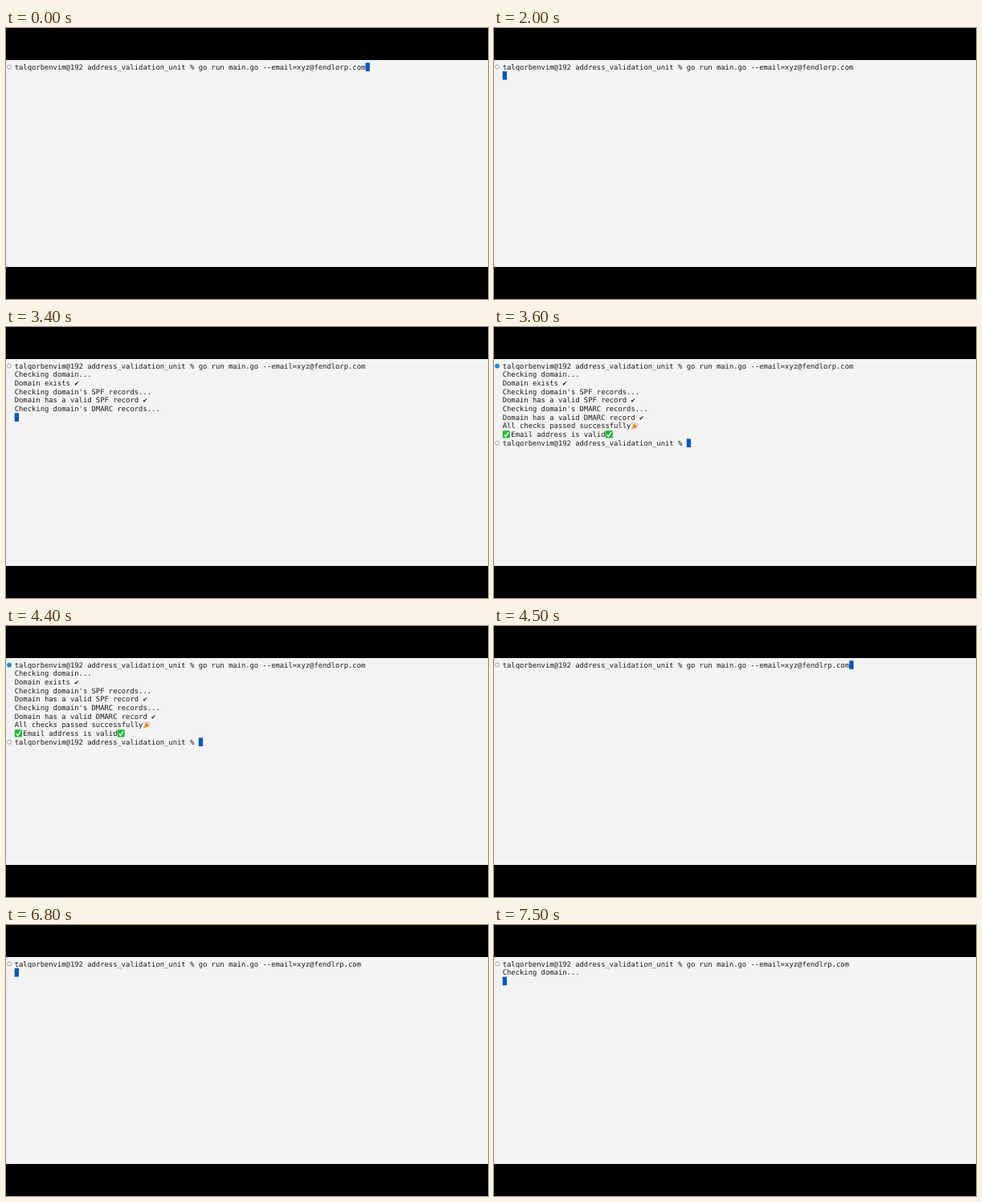
Recreate the animation shown at these times as an HTML page. Size 600x338 px, loop 8000 ms.

```html
<!DOCTYPE html>
<html lang="en">
<head>
<meta charset="utf-8">
<title>Terminal session</title>
<style>
  html, body { margin: 0; width: 100%; height: 100%; overflow: hidden; background: #000; }
  svg { display: block; width: 100%; height: 100%; }
  text {
    font: 8.85px "DejaVu Sans Mono", "Liberation Mono", monospace;
    fill: #1c1c1c;
    text-rendering: geometricPrecision;
    white-space: pre;
  }
</style>
</head>
<body>
<svg viewBox="0 0 600 338">
  <defs>
    <g id="tick">
      <rect x=".3" y=".6" width="9.2" height="9.2" rx="1.4" fill="#22b83a"/>
      <path d="M2.3 5.6 4.2 7.8 7.6 2.5" fill="none" stroke="#fff" stroke-width="1.4"/>
    </g>
    <g id="popper">
      <path d="M.5 9.6 3 3.2Q6.4 4.6 7.2 7.6Z" fill="#efa43c"/>
      <path d="M3 3.2Q6.6 3.6 7.2 7.6 4 7 3 3.2Z" fill="#c9722e"/>
      <path d="M4.4 3.5Q5.8 2.4 4.8.8M6.2 5.2Q7.6 3.4 9.2 4.2" fill="none" stroke="#e05a4a" stroke-width="1"/>
      <path d="M7.5 1.3h1.3v1.2H7.5zM7.9 6.3h1.4v1.2H7.9z" fill="#f0b44a"/>
      <path d="M1 1.8h1.2v1.2H1z" fill="#6a86b8"/>
    </g>
  </defs>
  <rect width="600" height="338"/>
  <rect y="40" width="600" height="258" fill="#f3f3f3"/>
  <g id="screen"></g>
</svg>
<script>
const LOOP = 8000;
const LEFT = 10.7, TOP = 43.3, CELL = 5.328, LINE = 10.68;

const prompt = "talqorbenvim@192 address_validation_unit % ";
const command = prompt + "go run main.go --email=";
const first = command + "xyz@fendlorp.com";
const second = command + "xyz@fendlrp.com";
const output = [
  "Checking domain...",
  "Domain exists ✔",
  "Checking domain's SPF records...",
  "Domain has a valid SPF record ✔",
  "Checking domain's DMARC records...",
  "Domain has a valid DMARC record ✔",
  "All checks passed successfully",
  "  Email address is valid"
];

// Each state: start time, command line, printed rows, whether the cursor has left the command.
const states = [
  { at: 0, line: first, rows: 0, entered: false },
  { at: 1000, line: first, rows: 0, entered: true },
  { at: 2600, line: first, rows: 3, entered: true },
  { at: 2800, line: first, rows: 5, entered: true },
  { at: 3500, line: first, rows: 8, entered: true },
  { at: 4500, line: second, rows: 0, entered: false },
  { at: 5800, line: second, rows: 0, entered: true },
  { at: 7200, line: second, rows: 1, entered: true }
];

const screen = document.getElementById("screen");
const colX = col => LEFT + col * CELL;
const rowY = row => TOP + row * LINE;

const textRow = (str, row) =>
  `<text x="${colX(0)}" y="${rowY(row) + 8.4}">${str}</text>`;
const cursor = (col, row) =>
  `<rect x="${colX(col)}" y="${rowY(row)}" width="5.3" height="10.6" fill="#0757b5"/>`;
const icon = (id, col, row) =>
  `<use href="#${id}" x="${colX(col) - .3}" y="${rowY(row)}"/>`;
const marker = (row, done) =>
  `<circle cx="4" cy="${rowY(row) + 5.3}" r="${done ? 2.9 : 2.5}" ` +
  (done ? `fill="#1f88cf"/>` : `fill="none" stroke="#999" stroke-width=".8"/>`);

function render({ line, rows, entered }) {
  const done = rows === output.length;
  const parts = [marker(0, done), textRow(line, 0)];
  output.slice(0, rows).forEach((str, i) => parts.push(textRow(str, i + 1)));
  if (done) {
    parts.push(
      icon("popper", 30, 7), icon("tick", 0, 8), icon("tick", 24, 8),
      marker(9, false), textRow(prompt, 9), cursor(prompt.length, 9)
    );
  } else {
    parts.push(entered ? cursor(0, rows + 1) : cursor(line.length, 0));
  }
  screen.innerHTML = parts.join("");
}

let shown;
function frame() {
  const t = performance.now() % LOOP;
  const state = states.findLast(s => s.at <= t);
  if (state !== shown) render(shown = state);
  requestAnimationFrame(frame);
}
frame();
</script>
</body>
</html>
```
